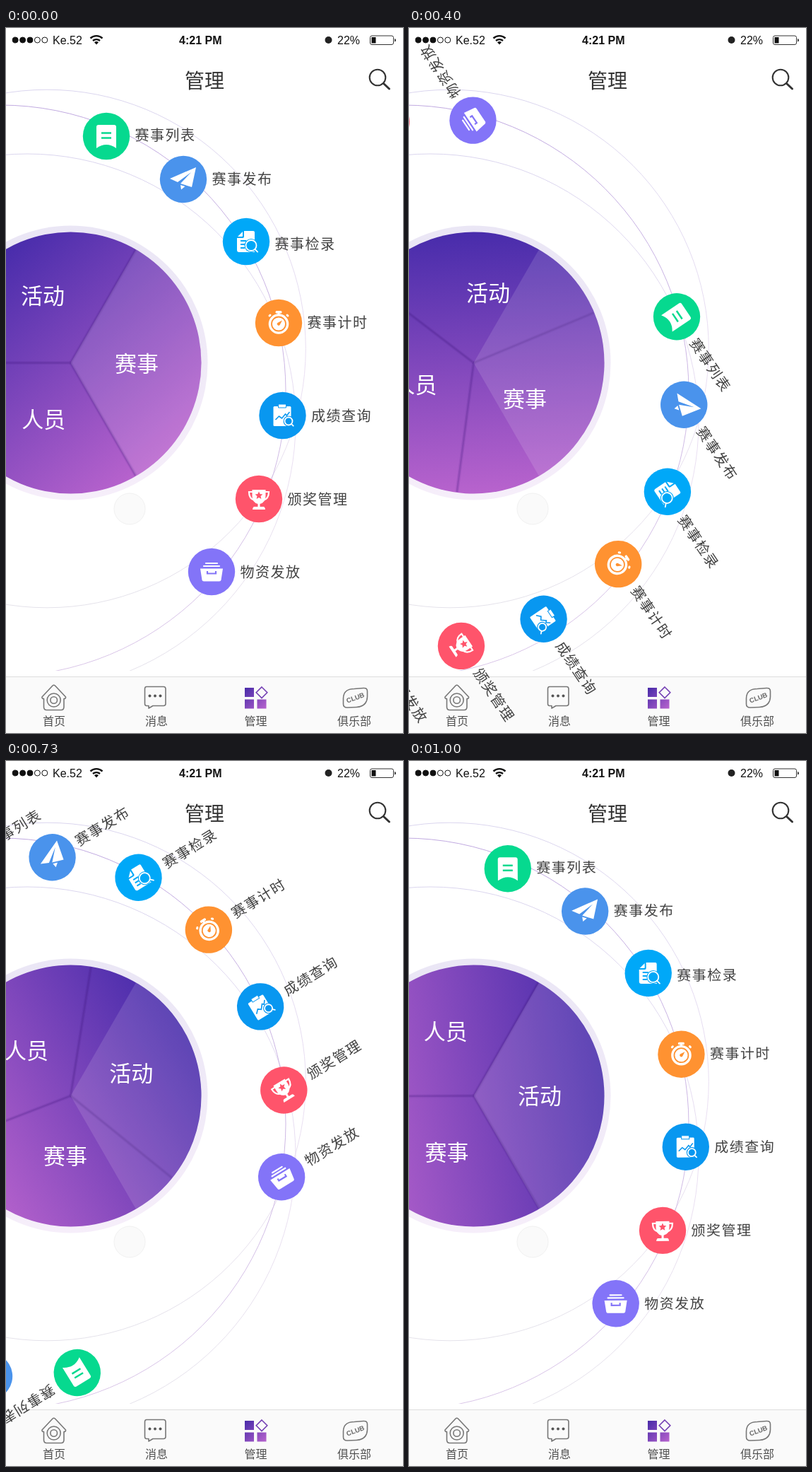
Write an HTML page that moves like this. It is 562 px wide and 997 px high and loops after 1.07 s.

```html
<!DOCTYPE html>
<html lang="zh-CN">
<head>
<meta charset="utf-8">
<title>管理</title>
<style>
  html, body { margin: 0; width: 100%; height: 100%; overflow: hidden; background: #fff; }
  svg { display: block; width: 562px; height: 997px; }
  text { font-family: "Noto Sans CJK SC", "Noto Sans CJK", sans-serif; }
  .status text { font: 16px "Liberation Sans", Arial, sans-serif; fill: #111; }
  .status .clock { font-weight: bold; }
  .tabs text { font-size: 16px; fill: #505050; text-anchor: middle; }
  .tabs .club { font: bold 9.5px "Liberation Sans", Arial, sans-serif; fill: #666; }
  .names text { font-size: 31px; font-weight: 300; fill: #fff; text-anchor: middle; }
  .item text { font-size: 20px; letter-spacing: 1.5px; fill: #424242; }
  .line { fill: none; stroke: #777; stroke-width: 1.6; stroke-linejoin: round; stroke-linecap: round; }
</style>
</head>
<body>
<svg viewBox="0 0 562 997">
  <defs>
    <linearGradient id="disc" gradientUnits="userSpaceOnUse" x1="-185" x2="185" y1="0" y2="0" gradientTransform="rotate(50)">
      <stop stop-color="#482cab"/>
      <stop offset="1" stop-color="#b863cd"/>
    </linearGradient>
    <linearGradient id="halo" x2="0" y2="1">
      <stop stop-color="#eae6f5"/>
      <stop offset="1" stop-color="#f6eefa"/>
    </linearGradient>
    <linearGradient id="grid" gradientUnits="userSpaceOnUse" x1="338" y1="932" x2="369" y2="963">
      <stop stop-color="#462aa8"/>
      <stop offset="1" stop-color="#b964ce"/>
    </linearGradient>
    <linearGradient id="orbit" x2="0" y2="1">
      <stop stop-color="#dad5ee"/>
      <stop offset="0.55" stop-color="#eadff2"/>
      <stop offset="1" stop-color="#e4e2ea"/>
    </linearGradient>
    <linearGradient id="track" x2="0" y2="1">
      <stop stop-color="#c0a9e0"/>
      <stop offset="1" stop-color="#dac6e8"/>
    </linearGradient>
    <clipPath id="above"><path d="M0 0H562V909H0Z"/></clipPath>
  </defs>

  <g fill="none" clip-path="url(#above)">
    <circle cx="58" cy="453.5" r="366.3" stroke="url(#orbit)"/>
    <circle cx="30" cy="558" r="380" stroke="url(#orbit)"/>
    <circle cx="-8" cy="513" r="404" stroke="url(#track)"/>
  </g>
  <circle cx="175" cy="680" r="22" fill="#fafafa" stroke="#f1f1f1"/>

  <g transform="translate(91.5 473.5)">
    <circle r="194" fill="url(#halo)"/>
    <g id="wheel">
      <circle r="185" fill="url(#disc)"/>
      <g id="spokes" stroke="#3c1478"></g>
    </g>
    <path d="M0 0L92.500 -160.200A185 185 0 0 1 92.500 160.200Z" fill="#fff" fill-opacity=".12"/>
  </g>
  <g class="names" id="names"></g>

  <g class="tabs">
    <path d="M0 917H562V997H0Z" fill="#fafafa"/>
    <path d="M0 917.5H562" stroke="#dedede"/>
    <g class="line">
      <path d="M51 946L66 930Q67.700 928.500 69.400 930L84.500 946Q85 948.500 82 948.500V960Q82 964.500 78 964.500H57.500Q53.500 964.500 53.500 960V948.500Q50.500 948.500 51 946Z"/>
      <circle cx="67.700" cy="950.500" r="9.500"/>
      <circle cx="67.700" cy="950.500" r="4.800"/>
      <path d="M199 931.500H223Q226 931.500 226 934.500V955.500Q226 958.500 223 958.500H208L202 962V958.500H199Q196.500 958.500 196.500 955.500V934.500Q196.500 931.500 199 931.500Z"/>
      <path d="M477.500 948C477.500 938 485 934.500 493 934.500L506 933.500Q511.500 933 511.500 938V946C511 956 505 960 496 960.500L483 961Q477.500 961 477.500 956Z"/>
    </g>
    <g fill="#555">
      <circle cx="203.500" cy="944.500" r="2"/><circle cx="211" cy="944.500" r="2"/><circle cx="218.500" cy="944.500" r="2"/>
    </g>
    <path d="M338 933h13v13h-13zM338 949.500h13v13h-13zM355.500 949.500h13v13h-13z" fill="url(#grid)"/>
    <path d="M362 932l7.800 7.800l-7.800 7.800l-7.800 -7.800z" fill="none" stroke="#7440b4" stroke-width="1.6"/>
    <text class="club" x="0" y="3.400" transform="translate(494.500 947) rotate(-20)">CLUB</text>
    <text x="68" y="986">首页</text>
    <text x="213" y="986">消息</text>
    <text x="353.500" y="986">管理</text>
    <text x="493" y="986">俱乐部</text>
  </g>

  <g class="status">
    <g id="signal" stroke="#111"></g>
    <text x="66" y="22.500">Ke.52</text>
    <g fill="none" stroke="#111" stroke-width="2.4">
      <path d="M119.500 14.500A12.500 12.500 0 0 1 136.500 14.500M123 18A7.500 7.500 0 0 1 133 18"/>
    </g>
    <path d="M128 23.500L125 20.300A4.500 4.500 0 0 1 131 20.300Z" fill="#111"/>
    <text class="clock" x="245" y="22.500">4:21 PM</text>
    <circle cx="456.500" cy="17" r="5" fill="#222"/>
    <text x="469" y="22.500">22%</text>
    <rect x="515.500" y="11" width="33" height="12.500" rx="2.500" fill="none" stroke="#333"/>
    <path d="M517.500 13h6v8.500h-6z" fill="#111"/>
    <path d="M550 15q2 0.500 2 2.300t-2 2.300z" fill="#333"/>
  </g>
  <text x="281" y="84.500" font-size="28" text-anchor="middle" fill="#333">管理</text>
  <g fill="none" stroke="#333" stroke-linecap="round">
    <circle cx="526" cy="70" r="11.300" stroke-width="2.100"/>
    <path d="M534.500 78.500L542.500 86" stroke-width="3"/>
  </g>

  <g id="ring">
    <g id="items"></g>
    <use href="#items" transform="rotate(180 20.8 503.2)"/>
  </g>
</svg>

<script>
const $ = id => document.getElementById(id);
const HUB = { x: 91, y: 464 };
const RING = '20.8 503.2';
const LOOP = 1070, STEPS = 16;
const TURN = 15.5; // steps in a full turn, cut just before its end

// Each icon is drawn in white around the middle of its badge; c is the badge colour.
const lens = (x, y, r, c) => `
  <circle cx="${x}" cy="${y}" r="${r + 2}" fill="${c}"/>
  <g fill="none" stroke="#fff" stroke-width="1.8" stroke-linecap="round">
    <circle cx="${x}" cy="${y}" r="${r}"/>
    <path d="M${x + r * .72} ${y + r * .72}l${r * .5} ${r * .5}"/>
  </g>`;

const icons = {
  list: c => `<path d="M-14 -13q0 -3 3 -3h22q3 0 3 3v30q-7 -5 -14 -5t-14 5z"/>
    <path d="M-7 -4.500h14M-7 2.500h14" stroke="${c}" stroke-width="2.500"/>`,
  plane: () => `<path d="M18 -17L-19 -1L-8 4L11 -10L-4 6L12 11Z"/><path d="M-4 8L-3 14.500L2.500 10Z"/>`,
  check: c => `<path d="M-3 -15h13q2 0 2 2v28h-22q-3 0 -3 -3v-17h8q2 0 2 -2z"/><path d="M-5 -14v6q0 1 -1 1h-6z"/>
    <path d="M-8 -1h8M-8 4h6M-8 9h6" stroke="${c}" stroke-width="2"/>${lens(7, 5.5, 7.5, c)}`,
  watch: c => `<circle cy="1.500" r="14.300"/><rect x="-4.500" y="-17" width="9" height="3.500" rx="1.500"/>
    <path d="M-1.500 -15h3v4h-3z"/><path d="M-12 -11l-1 1M12 -11l1 1" stroke="#fff" stroke-width="3" stroke-linecap="round"/>
    <circle cy="1.500" r="10" fill="none" stroke="${c}" stroke-width="1.800"/>
    <path d="M5 -3.500L1.600 3.100A2.200 2.200 0 1 1 -1.600 -.1Z" fill="${c}"/>`,
  chart: c => `<rect x="-13" y="-13" width="25" height="28" rx="1.500"/>
    <path d="M-6 -16h11v5h-11z" stroke="${c}"/>
    <path d="M-10 6l5 -5l4 3l5 -6l2 2l4 -5" fill="none" stroke="${c}" stroke-width="1.600"/>${lens(8.5, 8, 5.5, c)}`,
  cup: c => `<path d="M-9.500 -13h19v9q0 9 -8 11v4h5q2 0 2.500 4h-18q.5 -4 2.500 -4h5v-4q-8 -2 -8 -11z"/>
    <path d="M-9 -10h-5q0 10 8 12M9 -10h5q0 10 -8 12" fill="none" stroke="#fff" stroke-width="2.200"/>
    <path d="M0 -10.500l1.600 3.600l3.800 .4l-2.900 2.600l.9 3.900l-3.400 -2l-3.400 2l.9 -3.900l-2.900 -2.600l3.800 -.4z" fill="${c}"/>`,
  drawer: c => `<path d="M-8 -12h16M-11 -8h22" stroke="#fff" stroke-width="2.200" stroke-linecap="round"/>
    <path d="M-16 -4.500h32l-2.500 16q-.4 2 -2.500 2h-22q-2.100 0 -2.500 -2z"/>
    <path d="M-6 -1v3.500h12v-3.500" fill="none" stroke="${c}" stroke-width="2.200"/>`
};

// x, y, colour, icon, label, label shift
const items = [
  [142, 153, '#06d98f', 'list', '赛事列表', -1.5],
  [251, 214, '#4a93ec', 'plane', '赛事发布', -1],
  [340, 302, '#00a8f8', 'check', '赛事检录', 3],
  [386, 417, '#ff9231', 'watch', '赛事计时', -1],
  [391.5, 548, '#0897f0', 'chart', '成绩查询', 0],
  [358, 666, '#ff546b', 'cup', '颁奖管理', 0],
  [291, 769, '#8374f8', 'drawer', '物资发放', 0]
];
$('items').innerHTML = items.map(([x, y, c, icon, label, dy]) => `
  <g class="item" transform="translate(${x} ${y})">
    <circle r="33.200" fill="${c}"/>
    <g fill="#fff">${icons[icon](c)}</g>
    <text x="40.500" y="${dy + 7.6}">${label}</text>
  </g>`).join('');

$('spokes').innerHTML = [-60, 60, 180].map(a => `
  <g transform="rotate(${a})">
    <path d="M0 0H184" stroke-width="5" stroke-opacity=".09"/>
    <path d="M0 0H184" stroke-width="2.400" stroke-opacity=".2"/>
  </g>`).join('');

$('signal').innerHTML = [0, 1, 2, 3, 4].map(i =>
  `<circle cx="${13.2 + i * 10.4}" cy="17" r="4" fill="${i < 3 ? '#111' : '#fff'}"/>`).join('');

// Polar paths around the hub: the radius dips on the way to the next sector.
const names = [
  { text: '活动', from: -114.4, to: 6.1, r0: 94.4, r1: 94.5, dip: 6 },
  { text: '赛事', from: 6.1, to: 113, r0: 94.5, r1: 96.8, dip: 2 },
  { text: '人员', from: 113, to: 244.6, r0: 96.8, r1: 91, dip: 10.8 }
];
$('names').innerHTML = names.map(n => `<text>${n.text}</text>`).join('');
const nameNodes = [...$('names').children];

const mix = (a, b, s) => a + (b - a) * s;

// Same curve as CSS ease-in-out.
function easeInOut(p) {
  let lo = 0, hi = 1;
  for (let i = 0; i < 24; i++) {
    const u = (lo + hi) / 2;
    const x = 3 * u * (1 - u) * (.42 * (1 - u) + .58 * u) + u ** 3;
    if (x < p) lo = u; else hi = u;
  }
  return lo * lo * (3 - 2 * lo);
}

// The picture advances 15 times a second, on a 10 ms grid.
const stamps = Array.from({ length: STEPS }, (_, k) => 10 * Math.round(k * 20 / 3));

function draw(time) {
  const step = stamps.filter(t => t <= time).length - 1;
  const s = easeInOut(step / TURN);
  $('ring').setAttribute('transform', `rotate(${180 * s} ${RING})`);
  $('wheel').setAttribute('transform', `rotate(${120 * s})`);
  names.forEach((n, i) => {
    const a = mix(n.from, n.to, s) * Math.PI / 180;
    const r = mix(n.r0, n.r1, s) - n.dip * Math.sin(Math.PI * s * s);
    nameNodes[i].setAttribute('x', HUB.x + r * Math.cos(a));
    nameNodes[i].setAttribute('y', HUB.y + r * Math.sin(a) + 11.8);
  });
}

const start = performance.now();
function tick() {
  draw((performance.now() - start) % LOOP);
  requestAnimationFrame(tick);
}
tick();
</script>
</body>
</html>
```
